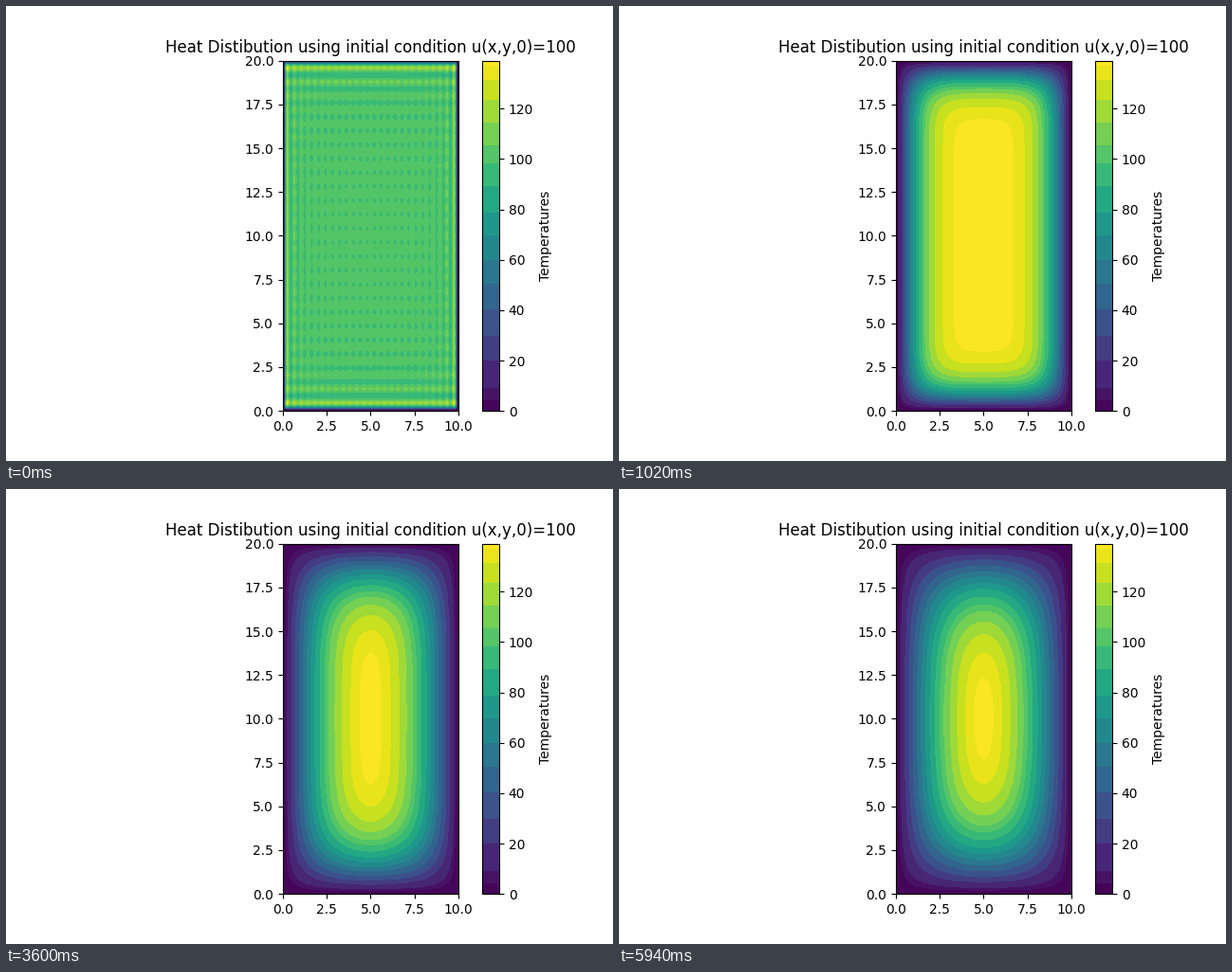
Write a matplotlib script that moves like this. It is 640 px wide and 480 px high and loops after 6 s.

```python
import numpy as np
import matplotlib.pyplot as plt
from matplotlib.animation import FuncAnimation
from matplotlib.colors import ListedColormap

WIDTH, HEIGHT = 10, 20        # plate size
U0 = 100                      # initial temperature
ALPHA_DT = 0.0555             # diffusivity times the time step
FRAMES, INTERVAL = 100, 60
ODD = np.arange(1, 50, 2)     # odd modes of the truncated sine series


def profile(s, length, tau):
    """Truncated series of a unit square pulse after diffusion time tau."""
    k = ODD * np.pi / length
    return np.sin(np.outer(s, k)) @ (4 / (np.pi * ODD) * np.exp(-k**2 * tau))


def temperature(i):
    tau = i * ALPHA_DT
    return U0 * np.outer(profile(y, HEIGHT, tau), profile(x, WIDTH, tau))


def banded(name, edges):
    """Colormap with one flat colour between each pair of edges."""
    bounds = np.array([0, *edges, 1])
    mids = (bounds[:-1] + bounds[1:]) / 2
    steps = np.digitize((np.arange(256) + 0.5) / 256, edges)
    return ListedColormap(plt.get_cmap(name)(mids)[steps])


x = np.linspace(0, WIDTH, 100)
y = np.linspace(0, HEIGHT, 200)
first = temperature(0)
peak = first.max()
cmap = banded("viridis", [0.03, 0.068, 0.143, 0.214, 0.29, 0.363, 0.43, 0.5,
                          0.566, 0.64, 0.706, 0.758, 0.825, 0.888, 0.945,
                          0.985])

fig, ax = plt.subplots(figsize=(6.4, 4.8), dpi=100)
im = ax.imshow(first, cmap=cmap, vmin=0, vmax=peak,
               extent=[0, WIDTH, 0, HEIGHT], origin="lower")
ax.set_xticks(np.arange(0, 10.1, 2.5))
ax.set_yticks(np.arange(0, 20.1, 2.5))
ax.set_title("Heat Distibution using initial condition u(x,y,0)=100")
fig.colorbar(im, ax=ax, label="Temperatures")


def update(i):
    # Colours always span the current range, while the colorbar stays fixed.
    u = temperature(i)
    im.set_data(u * peak / u.max())
    return [im]


anim = FuncAnimation(fig, update, frames=FRAMES, interval=INTERVAL,
                     repeat=True, repeat_delay=0)
plt.show()
```
